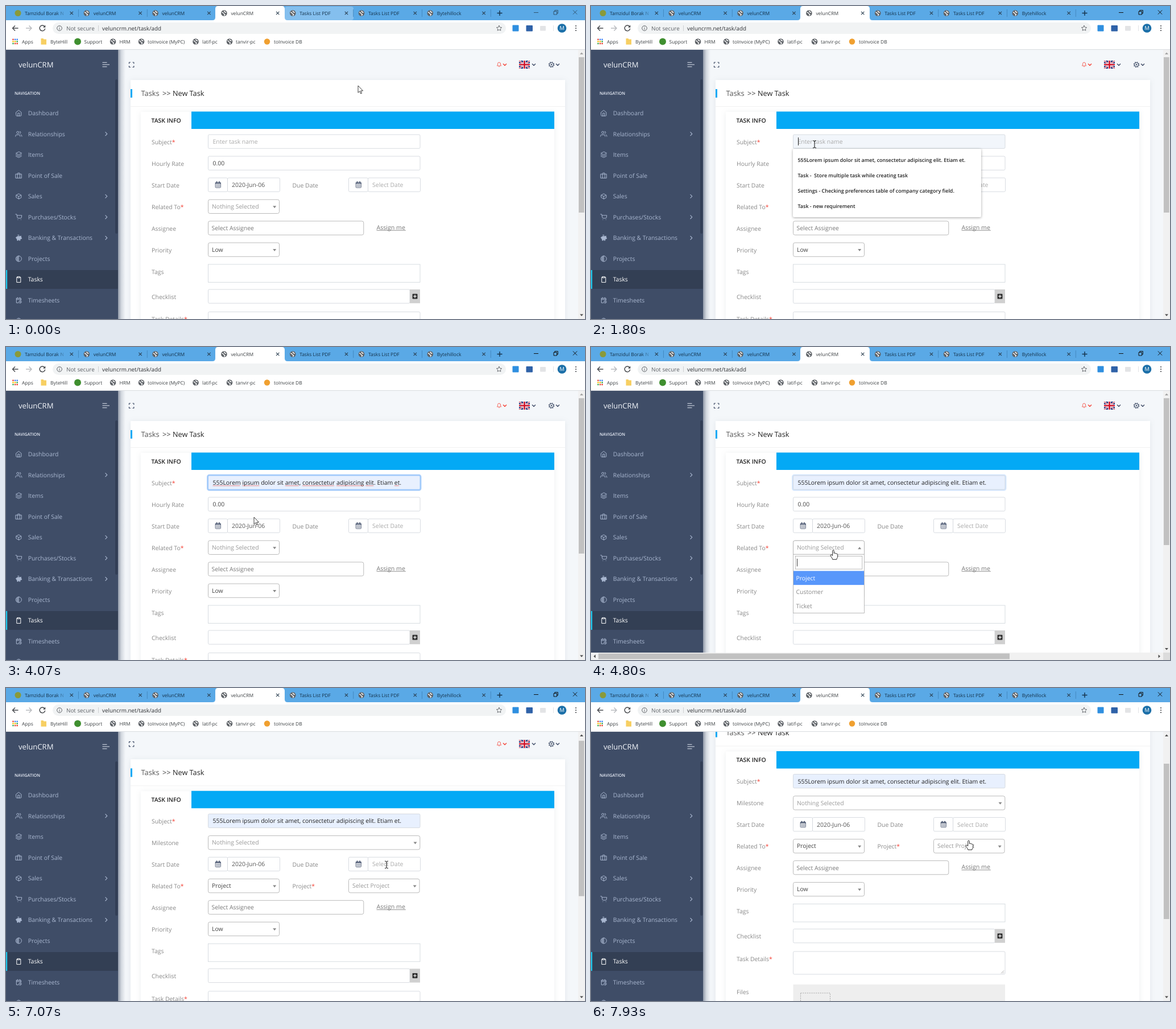
Animation, 1018 px wide and 550 px high, one loop 8 s. Source, as an HTML page:

```html
<!DOCTYPE html>
<html lang="en">
<head>
<meta charset="utf-8">
<title>New Task</title>
<style>
  html, body { margin: 0; width: 100%; height: 100%; overflow: hidden; background: #f4f7fa; }
  svg { display: block; width: 100vw; height: 100vh; font-family: "Open Sans", "Noto Sans", sans-serif; }
  text { white-space: pre; text-rendering: geometricPrecision; }
  .plain { font-family: "Liberation Sans", Arial, sans-serif; }
  .popup { filter: drop-shadow(0 1px 2px rgba(0, 0, 0, .35)); }
  .card { filter: drop-shadow(0 1px 5px rgba(69, 90, 100, .1)); }
</style>
</head>
<body>
<svg viewBox="0 0 1018 550">
  <defs>
    <linearGradient id="shade"><stop stop-color="#3f4d67" stop-opacity=".55"/><stop offset=".45" stop-color="#3f4d67" stop-opacity=".18"/><stop offset="1" stop-color="#3f4d67" stop-opacity="0"/></linearGradient>
    <linearGradient id="fade"><stop stop-color="#5aa9e6" stop-opacity="0"/><stop offset="1" stop-color="#5aa9e6"/></linearGradient>
  </defs>
</svg>
<script>
const NS = 'http://www.w3.org/2000/svg';
let cur = document.querySelector('svg');

// ---- drawing helpers ----
function el(tag, attrs) {
  const e = document.createElementNS(NS, tag);
  for (const k in attrs) e.setAttribute(k, attrs[k]);
  cur.append(e);
  return e;
}
function group(draw, attrs) {
  const parent = cur, g = cur = el('g', attrs);
  draw();
  cur = parent;
  return g;
}
const box = (x, y, width, height, fill = 'none', stroke = 'none', rx = 0) =>
  el('rect', { x, y, width, height, fill, stroke, rx, 'stroke-width': .8 });
const disc = (cx, cy, r, fill) => el('circle', { cx, cy, r, fill });
const path = (d, stroke, width = 1, fill = 'none') =>
  el('path', { d, stroke, fill, 'stroke-width': width, 'stroke-linejoin': 'round' });
function text(x, mid, str, size = 10.43, fill = '#888', attrs = {}) {
  const t = el('text', { x, y: mid + size * .36, 'font-size': size, fill, ...attrs });
  t.textContent = str;
  return t;
}
// icons are drawn on a 24 unit square around (x, y)
const icon = (x, y, d, stroke, k = .5, fill = 'none', width = 2) =>
  el('path', { d, stroke, fill, 'stroke-width': width, 'stroke-linecap': 'round', 'stroke-linejoin': 'round',
    transform: `translate(${x} ${y}) scale(${k}) translate(-12 -12)` });
const chevron = (x, y, color, w = 1.2) => path(`M${x - 3} ${y - 1.5}l3 3 3-3`, color, w);
const cross = (x, y, r, color, w = 1.1) => path(`M${x - r} ${y - r}l${2 * r} ${2 * r}m0 ${-2 * r}l${-2 * r} ${2 * r}`, color, w);
function globe(x, y) {
  disc(x, y, 5.3, '#5f6368');
  path(`M${x - 3.8} ${y - 1.5}q2 .3 3 2t2 1.5-1 2.6M${x} ${y - 4}q.5 2.4 3.6 2.8`, '#fff', 1.3);
}

// ---- form helpers; each control also becomes a pointer zone ----
const zones = [];
let only = null;
const zone = (kind, x, y, w, h) => zones.push({ kind, x, y, w, h, only });
function input(x, y, w, h = 24.3, r = 2, stroke = '#ced4da') {
  zone('beam', x, y, w, h);
  return box(x, y, w, h, '#fff', stroke, r);
}
function select(x, y, w, str, fill = '#444') {
  zone('hand', x, y, w, 24.3);
  box(x, y, w, 24.3, '#fff', '#aaa', 3);
  path(`M${x + w - 11.3} ${y + 11}h6l-3 4z`, 'none', 0, '#888');
  return text(x + 6.5, y + 12, str, undefined, fill);
}
function label(str, y, needed, x = 256) {
  const t = text(x, y, str);
  if (!needed) return;
  const star = document.createElementNS(NS, 'tspan');
  star.setAttribute('fill', '#f44236');
  star.textContent = '*';
  t.append(star);
}
function dateField(x, str, fill) {
  box(x, 302, 34, 24.3, '#fff', '#ced4da', 2);
  const cx = x + 17.3, ink = '#33415e';
  box(cx - 4.6, 309.8, 9.2, 9.4, 'none', ink, 1);
  path(`M${cx - 4.6} 311.5h9.2M${cx - 2.3} 308.3v2M${cx + 2.3} 308.3v2`, ink, 1.5);
  el('path', { d: `M${cx - 3} 314.4h7M${cx - 3} 316.8h7`, stroke: ink, 'stroke-width': 1.2, 'stroke-dasharray': '1.5 .9' });
  input(x + 34, 302, 92);
  text(x + 41.6, 314.3, str, undefined, fill);
}

const phrase = '555Lorem ipsum dolor sit amet, consectetur adipiscing elit. Etiam et.';
const grey = '#999', ink = '#444';
let subject, ring, holder, preview, value, wave, caret, plainRow, projectRow, popup, hot, list, searchCaret, valueEnd;

// ---- page ----
const page = group(() => {
  path('M216.5 101.5v-2.500h2.500M222.500 99h2.300v2.500M224.800 105v2.500h-2.300M219 107.500h-2.500v-2.500', '#3f4d67', 1.2);
  icon(867, 103, 'M18 8a6 6 0 0 0-12 0c0 7-3 9-3 9h18s-3-2-3-9M13.700 21a2 2 0 0 1-3.400 0', '#f44236', .4);
  chevron(877, 103, '#f44236', 1.4);
  box(902, 96, 19, 14, '#1d2f78');
  path('M902 96l19 14M921 96l-19 14', '#fff', 2.6);
  path('M902 96l19 14M921 96l-19 14', '#cf142b', 1);
  path('M911.500 96v14M902 103h19', '#fff', 4.6);
  path('M911.500 96v14M902 103h19', '#cf142b', 2.6);
  chevron(928, 103, '#3f4d67', 1.4);
  el('circle', { cx: 959, cy: 103, r: 4.4, fill: 'none', stroke: '#3f4d67', 'stroke-width': 1.5, 'stroke-dasharray': '1.9 1.55' });
  el('circle', { cx: 959, cy: 103, r: 3.4, fill: 'none', stroke: '#3f4d67', 'stroke-width': .9 });
  disc(959, 103, 1.2, '#3f4d67');
  chevron(970, 103, '#3f4d67', 1.4);

  box(219, 130, 764, 600, '#fff').setAttribute('class', 'card');
  box(219, 146, 3, 15, '#04a9f5');
  text(237.5, 153, 'Tasks', 12.8, '#555', { 'font-weight': 500 });
  text(275, 153, '>>', 12.7, '#444');
  text(293, 153, 'New Task', 12.7, '#222');
  path('M219 176.500h764', '#f1f1f1');
  box(237, 186, 727, 500, '#fff').setAttribute('class', 'card');
  box(326, 185.5, 638, 30.5, '#04a9f5');
  text(255.5, 201, 'TASK INFO', 10.43, '#222', { 'font-weight': 600 });

  label('Subject', 239, true);
  ring = box(354.400, 225, 374.700, 26.400, 'none', '#a8cdfa', 3);
  ring.setAttribute('stroke-width', 2.6);
  subject = input(355.500, 226, 372.500);
  holder = text(363.5, 238.3, 'Enter task name', 10.43, '#aaa');
  preview = text(363.5, 238.8, phrase, 9.93, '#222', { class: 'plain' });
  value = text(363.5, 238.3, phrase, 10.43, '#222');
  valueEnd = 363.5 + value.getComputedTextLength();
  wave = group(() => {
    for (const word of ['555Lorem', 'ipsum', 'amet', 'consectetur', 'adipiscing', 'elit', 'et.']) {
      const at = phrase.lastIndexOf(word), n = word.replace('.', '').length;
      const x = value.getStartPositionOfChar(at).x, w = value.getSubStringLength(at, n);
      path(`M${x} 244.300` + 'l1 -1l1 1'.repeat(Math.floor(w / 2)), '#e8453c', .7);
    }
  });
  caret = box(364, 231, 1, 14, '#222');

  only = 'plain';
  plainRow = group(() => {
    label('Hourly Rate', 277);
    input(355.5, 264, 372.5);
    text(363.5, 276.3, '0.00', 10.43, ink);
  });
  only = 'project';
  projectRow = group(() => {
    label('Milestone', 277);
    select(355.5, 264.3, 372.3, 'Nothing Selected', grey);
    label('Project', 353, true, 503.5);
    select(602.5, 340.2, 124.500, 'Select Project', grey);
  });
  only = null;

  label('Start Date', 315);
  dateField(355.5, '2020-Jun-06', '#555');
  label('Due Date', 315, false, 503.5);
  dateField(602.5, 'Select Date', '#aaa');

  label('Related To', 353, true);
  related = select(355.5, 340.200, 125, 'Nothing Selected', grey);

  label('Assignee', 391);
  input(355.5, 378, 273.3, 24.3, 3, '#aaa');
  text(361.500, 390.3, 'Select Assignee', 10.43, '#777');
  zone('hand', 652, 382, 51, 15);
  text(651.500, 389, 'Assign me', 10.600, '#777', { 'font-weight': 500 });
  path('M651.500 394.300h51.300', '#777', .8);

  label('Priority', 429);
  select(355.5, 416, 125, 'Low');
  label('Tags', 467);
  input(355.5, 454, 372.5, 31.5, 0);
  label('Checklist', 511);
  input(355.5, 498, 354.5);
  box(710, 498, 18, 24.3, '#d0d0d0');
  box(714.5, 505.7, 9, 9, '#333', 'none', 1.3);
  path('M719 507.500v5.400M716.300 510.200h5.400', '#fff', 1.2);
  label('Task Details', 550.5, true);
  input(355.5, 537.5, 372.5, 40);
  path('M721 576l5-5M724 576l2-2', '#888', .7);
  label('Files', 608.5);
  box(355.5, 595.5, 372.5, 90, '#eee');
  box(368.5, 610.5, 52, 50, 'none', '#999').setAttribute('stroke-dasharray', '2.200 1.600');

  list = group(() => {
    box(355.5, 364, 125, 103.500, '#fff', '#aaa');
    box(356, 340.600, 124, 23.500, '#fff');
    path('M355.500 364.300v-21q0-3 3-3h119q3 0 3 3v21z', '#aaa', .8, '#fff');
    text(362, 352.2, 'Nothing Selected', 10.43, grey);
    path('M469.200 355.200h6l-3-4z', 'none', 0, '#888');
    box(359.3, 367.500, 117.5, 22.700, '#fff', '#aaa');
    box(356, 393.500, 124, 24.600, '#5897fb');
    text(360.500, 406, 'Project', 10.43, '#fff');
    text(360.500, 430.600, 'Customer');
    text(360.500, 455, 'Ticket');
    searchCaret = box(362, 372, .9, 13.5, '#222');
  });

  popup = group(() => {
    box(355, 251, 331, 120, '#fff', 'none', 2).setAttribute('class', 'popup');
    hot = box(355, 257.5, 331, 26.500, '#c3c3c3');
    [phrase, 'Task -  Store multiple task while creating task',
      'Settings - Checking preferences table of company category field.', 'Task - new requirement']
      .forEach((s, i) => text(363.5, 271 + i * 26.8, s, 8.950, '#222', { 'font-weight': 600 }));
  });
});
function setRelated(str, fill) {
  related.textContent = str;
  related.setAttribute('fill', fill);
}

// ---- sidebar ----
group(() => {
  box(197, 77, 13, 473, 'url(#shade)');
  box(0, 77, 197, 473, '#3f4d67');
  text(22, 103, 'velunCRM', 13.1, '#f2f5fa');
  path('M169.500 99.300h8M169.500 103h12.500M169.500 106.700h8', '#dfe5ef', 1.1);
  text(15, 153, 'NAVIGATION', 7.4, '#e8edf7', { 'font-weight': 600 });
  box(192, 129, 4.5, 271, '#323e55', 'none', 2);
  box(0, 464, 197, 33, '#333f54');
  box(0, 464, 2.2, 33, '#1dc4e9');
  const menu = [
    ['Dashboard', 'M3 9l9-7 9 7v11a2 2 0 0 1-2 2H5a2 2 0 0 1-2-2zM9 22V12h6v10'],
    ['Relationships', 'M17 21v-2a4 4 0 0 0-4-4H5a4 4 0 0 0-4 4v2M23 21v-2a4 4 0 0 0-3-3.900M16 3.100a4 4 0 0 1 0 7.800M13 7a4 4 0 1 1-8 0 4 4 0 0 1 8 0', 1],
    ['Items', 'M12 2L2 7l10 5 10-5zM2 17l10 5 10-5M2 12l10 5 10-5'],
    ['Point of Sale', 'M2 7h20v14H2zM16 21V5a2 2 0 0 0-2-2h-4a2 2 0 0 0-2 2v16'],
    ['Sales', 'M21 16V8l-9-5-9 5v8l9 5zM3.300 8L12 12.500 20.700 8M12 21v-8.500', 1],
    ['Purchases/Stocks', 'M1 2h4l2.700 12.400a2 2 0 0 0 2 1.600h9.700a2 2 0 0 0 2-1.600L23 6H6M9 21v.1M20 21v.1', 1],
    ['Banking & Transactions', 'M3 11q2-5 9-5 3 0 5 1l3-2v4l2 3v3h-3l-2 2v4h-3v-3h-4v3H7v-4q-3-2-4-6zM9 2h4v1', 1, 1],
    ['Projects', 'M12 2a10 10 0 0 0 0 20a10 10 0 0 0 0-20M12 3v18M9 4v16M6 6v12'],
    ['Tasks', 'M16 4h3v18H5V4h3M8 2h8v4H8z'],
    ['Timesheets', 'M4 5h16v7M4 5v16h7M4 9h16M8 2v3M16 2v3M17 13a4.500 4.500 0 1 0 .1 0M17 16v2h2'],
    ['', 'M12 2a10 10 0 0 0 0 20a10 10 0 0 0 0-20']
  ];
  menu.forEach(([name, d, more, solid], i) => {
    const y = 188.2 + i * 36.55, color = name === 'Tasks' ? '#fff' : '#a9b7d0';
    icon(22.3, y, d, color, .5, solid ? color : 'none');
    text(38.7, y, name, 10.43, color);
    if (more) path(`M174.500 ${y - 3.300}l3.300 3.300-3.300 3.300`, color, 1.1);
  });
});

// ---- browser frame ----
box(0, 0, 1018, 25, '#5aa9e6');
const tabHover = box(490, 1, 121, 24, '#84bfee', 'none', 4);
path('M363 25q5 0 5-5V5q0-5 5-5h112q5 0 5 5v15q0 5 5 5z', 'none', 0, '#fff');
['Tamzidul Borak N', 'velunCRM', 'velunCRM', 'velunCRM', 'Tasks List PDF', 'Tasks List PDF', 'Bytehillock'].forEach((name, i) => {
  const x = 21 + i * 120.8;
  if (i) globe(x, 12.5); else disc(x, 12.5, 5.5, '#8a9a3a');
  text(x + 12, 12.5, name, 8.45, i === 3 ? '#3c4043' : '#15324a');
  if (!i) box(88, 4, 18, 18, 'url(#fade)');
  cross(x + 94.3, 12.5, 2.700, '#2b3f50');
  if (i !== 2 && i !== 3) path(`M${x + 106.500} 6v13`, '#3f82b8', .8);
});
path('M863.500 12.500h9M868 8v9', '#15324a', 1.4);
const winButtons = group(() => {
  path('M928 11.500h8', '#111', 1);
  path('M963 9.500h5.500v5.500H963zM964.800 9.300V7.500h5.500v5.500h-1.600', '#111', 1);
  cross(1000.500, 11, 3.600, '#111', 1);
});

box(0, 25, 1018, 51, '#fff');
path('M0 76.500h1018', '#d9dce0', 1);
box(82, 29, 797, 20, '#f1f3f4', 'none', 10);
path('M21.500 39h-10M16 34.500l-4.500 4.500 4.500 4.500', '#4a4d51', 1.5);
path('M35 39h10M40.500 34.500l4.500 4.500-4.500 4.500', '#b9bcc0', 1.5);
path('M67.800 36a4.800 4.800 0 1 0 .9 3.600', '#4a4d51', 1.5);
path('M69.300 33.500v4.300H65z', 'none', 0, '#4a4d51');
el('circle', { cx: 94, cy: 39, r: 4.3, fill: 'none', stroke: '#5f6368' });
path('M94 38.500v3M94 36.300v1.100', '#5f6368', 1);
text(106, 39, 'Not secure', 9.850, '#5f6368');
path('M162.500 34v10', '#c4c7ca', .8);
text(169, 39, 'veluncrm.net/task/add', 9.850, '#303236');
icon(867, 39, 'M12 2l3.100 6.300 6.900 1-5 4.900 1.200 6.800L12 17.800 5.800 21 7 14.200 2 9.300l6.900-1z', '#5f6368', .46);
box(890.5, 33.5, 11, 11, '#2f8fe0', 'none', 1);
box(914.5, 34, 11.500, 10.500, '#2f62a8', 'none', 1);
box(939, 35, 10, 8.5, '#e3e4e6', 'none', 1);
path('M962.500 34v10', '#dadce0', .8);
disc(977.500, 39, 7.800, '#1b6fa8');
text(977.500, 39, 'M', 9.500, '#fff', { 'text-anchor': 'middle' });
for (const y of [35, 39, 43]) disc(1002, y, 1.100, '#4a4d51');

for (let i = 0; i < 9; i++)
  box(11.3 + i % 3 * 3.600, 57.600 + Math.floor(i / 3) * 3.600, 2.400, 2.400, ['#ea4335', '#34a853', '#fbbc05', '#4285f4'][(i * 3 + (i >> 1)) % 4]);
path('M61.500 57h4l1 1.500h4.500v9.300h-9.500z', 'none', 0, '#f7cf62');
disc(126, 62.5, 6, '#3f8f2f');
for (const x of [188, 238, 333.500, 393]) globe(x, 62.5);
disc(459, 62.5, 5.2, '#f0a030');
[[28, 'Apps'], [78, 'ByteHill'], [137.500, 'Support'], [199.500, 'HRM'], [249, 'toInvoice (MyPC)'], [345, 'latif-pc'],
  [404, 'tanvir-pc'], [471, 'toInvoice DB']].forEach(([x, s]) => text(x, 62.5, s, 8.45, '#3c4043'));

// ---- scrollbars ----
box(1006, 77, 12, 473, '#f1f1f1');
const upArrow = path('M1009 85h6l-3-3.500z', 'none', 0, '#505050');
const thumb = box(1007, 90, 9.600, 273, '#c1c1c1');
const downArrow = path('M1009 541.500h6l-3 3.500z', 'none', 0, '#505050');
const bottomBar = group(() => {
  box(0, 537, 1006, 13, '#f1f1f1');
  box(1006, 537, 12, 13, '#dcdcdc');
  box(13, 538.500, 723, 10, '#c1c1c1');
  path('M8 540.500v6l-3.500-3zM997.500 540.500v6l3.500-3z', 'none', 0, '#505050');
});

// ---- pointer ----
const pointers = {
  arrow: path('M0 0v12.300l2.800-2.600 1.900 4.300 1.900-.8-1.900-4.200h3.900z', '#111', .8, '#fff'),
  beam: path('M-3-6.300Q0-6.300 0-4.800V4.800Q0 6.300-3 6.300M3-6.300Q0-6.300 0-4.800M3 6.300Q0 6.300 0 4.800', '#111', 1),
  hand: path('M-1.300 1.200C-1.300-.3 1.300-.3 1.300 1.200V5.500C1.800 4.600 3.600 4.800 3.700 6 4.400 5.200 5.800 5.600 5.900 6.700 6.800 6.200 7.700 6.800 7.700 7.800V11C7.700 13.500 6 14 5.800 16.300H-1.200C-1.500 14-4.800 10.800-5 9.300-5.100 8-3.300 7.600-1.300 9.600Z', '#111', .9, '#fff')
};
const route = [
  [0, 619, 140], [133, 607, 166], [200, 607, 166], [700, 311, 262], [1000, 401, 284], [1067, 401, 284],
  [1600, 393, 243], [2533, 393, 243], [2800, 424, 265], [3400, 424, 265], [4067, 436, 299], [4133, 436, 301],
  [4533, 426, 357], [5000, 426, 357], [5533, 421, 406], [5667, 421, 406], [5733, 419, 403], [5867, 422, 403],
  [6533, 660, 313.5], [6600, 660, 313.5], [6733, 669, 310.5], [7400, 669, 310.5], [7600, 668, 325],
  [7733, 656, 296], [7933, 664, 268], [8000, 664, 268]
];
const clamp = v => Math.min(1, Math.max(0, v));
const during = (t, ...spans) => spans.some(([a, b]) => t >= a && t < b);
const show = (e, on) => e.setAttribute('visibility', on ? 'inherit' : 'hidden');

function pointerAt(t) {
  const i = Math.max(1, route.findIndex(p => p[0] >= t));
  const [t0, x0, y0] = route[i - 1], [t1, x1, y1] = route[i];
  const k = clamp((t - t0) / (t1 - t0)), e = k * k * (3 - 2 * k);
  return [x0 + (x1 - x0) * e, y0 + (y1 - y0) * e];
}

function render(ms) {
  const t = Math.round(Math.floor((ms + 4) * 15 / 1000) * 1000 / 15); // 15 steps per second
  const [x, y] = pointerAt(t);
  const suggest = during(t, [1800, 3400]), filled = t >= 3400;
  const open = during(t, [4733, 5867]), project = t >= 5867;
  const hover = suggest && y > 257, wide = during(t, [4800, 5867]);
  const s = clamp((t - 7000) / 267);
  const scroll = 74.5 * (s < .5 ? 4 * s ** 3 : 1 - 4 * (1 - s) ** 3);

  page.setAttribute('transform', `translate(0 ${-scroll})`);
  tabHover.setAttribute('opacity', clamp(1 - t / 133));
  winButtons.setAttribute('opacity', t < 1800 ? .55 : 1);

  subject.setAttribute('fill', hover || filled ? '#e8f0fe' : t >= 1800 ? '#f2f6fb' : '#fff');
  const focus = clamp((t - 1800) / 133) * (1 - clamp((t - 4733) / 133));
  ring.setAttribute('opacity', focus);
  subject.setAttribute('stroke', focus > .5 ? '#8fc1fb' : '#ced4da');
  show(holder, !hover && !filled);
  show(preview, hover);
  show(value, filled);
  show(wave, during(t, [3467, 4733]));
  show(caret, during(t, [1800, 2333], [2733, 3333], [3400, 3933], [4467, 4733]));
  caret.setAttribute('x', filled ? valueEnd : 364);

  show(popup, suggest);
  show(hot, hover);
  show(list, open);
  show(searchCaret, during(t, [4800, 5333]));
  show(plainRow, !project);
  show(projectRow, project);
  setRelated(project ? 'Project' : 'Nothing Selected', project ? ink : grey);

  show(bottomBar, wide);
  thumb.setAttribute('y', 90 + scroll * .577);
  thumb.setAttribute('height', wide ? 258 : 273);
  upArrow.setAttribute('fill', scroll ? '#505050' : '#a3a3a3');
  downArrow.setAttribute('transform', `translate(0 ${wide ? -12.5 : 0})`);

  let kind = 'arrow';
  if (open && y > 364) kind = y > 367 && y < 390 ? 'beam' : 'arrow';
  else if (!(suggest && y > 251)) {
    const mode = project ? 'project' : 'plain', py = y + scroll;
    const z = zones.find(z => (!z.only || z.only === mode) &&
      x >= z.x && x <= z.x + z.w && py >= z.y && py <= z.y + z.h);
    if (z) kind = z.kind;
  }
  for (const k in pointers) show(pointers[k], k === kind);
  pointers[kind].setAttribute('transform', `translate(${x} ${y})`);
}

const start = performance.now();
function tick() {
  render((performance.now() - start) % 8000);
  requestAnimationFrame(tick);
}
tick();
</script>
</body>
</html>
```
